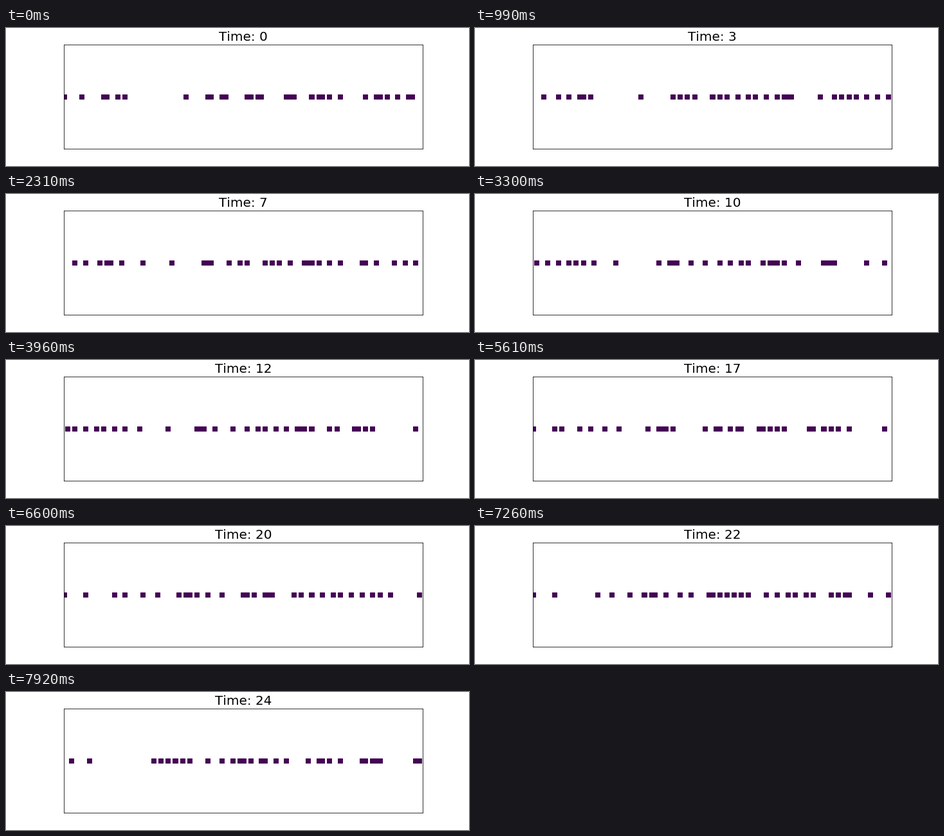
Animation, 720 px wide and 216 px high, one loop 8 s. Source, as a matplotlib script:

```python
import numpy as np
import matplotlib.pyplot as plt
from matplotlib.animation import FuncAnimation

CELLS = 100          # ring road length
V_MAX = 5            # cells per step
P_SLOW = 0.5         # chance that a driver dawdles
STEP_MS = 330        # time per traffic step
LOOP_MS = 8000
INTERVAL = 20

START = np.r_[0, 5, 11, 12, 15, 17, 34, 40, 41, 44, 45, 51, 52, 54, 55,
              62:65, 69, 71, 72, 74, 77, 84, 87, 88, 90, 93, 96, 97]


def gaps(cells):
    """Free cells in front of each car on the ring."""
    return (np.roll(cells, -1) - cells) % CELLS - 1


def simulate(steps, seed=3):
    """Nagel-Schreckenberg traffic: speed up, keep distance, dawdle, move."""
    rng = np.random.default_rng(seed)
    cells = START
    speed = np.minimum(gaps(cells), V_MAX)
    history = [cells]
    for _ in range(steps):
        speed = np.minimum(np.minimum(speed + 1, V_MAX), gaps(cells))
        dawdle = rng.random(len(cells)) < P_SLOW
        speed = np.maximum(speed - dawdle, 0)
        cells = (cells + speed) % CELLS
        history.append(cells)
    return history


history = simulate(LOOP_MS // STEP_MS)
road = np.zeros(len(START))

plt.rcParams["text.kerning_factor"] = 6
fig = plt.figure(figsize=(10, 3), dpi=72, facecolor="white")
fig.subplots_adjust(left=0.125, right=0.9, bottom=0.125, top=0.88)
ax = fig.add_subplot()
ax.set(xlim=(0, CELLS), ylim=(-1, 1), xticks=[], yticks=[])
title = ax.set_title("Time: 0", fontsize=20, fontname="DejaVu Sans")
cars = ax.scatter(START, road, c=road, s=50, marker="s", cmap="viridis")


def update(frame):
    step = int((frame + 0.5) * INTERVAL // STEP_MS)
    cars.set_offsets(np.column_stack([history[step], road]))
    title.set_text(f"Time: {step}")
    return cars, title


anim = FuncAnimation(fig, update, frames=LOOP_MS // INTERVAL, interval=INTERVAL,
                     repeat=True, repeat_delay=0)
plt.show()
```
